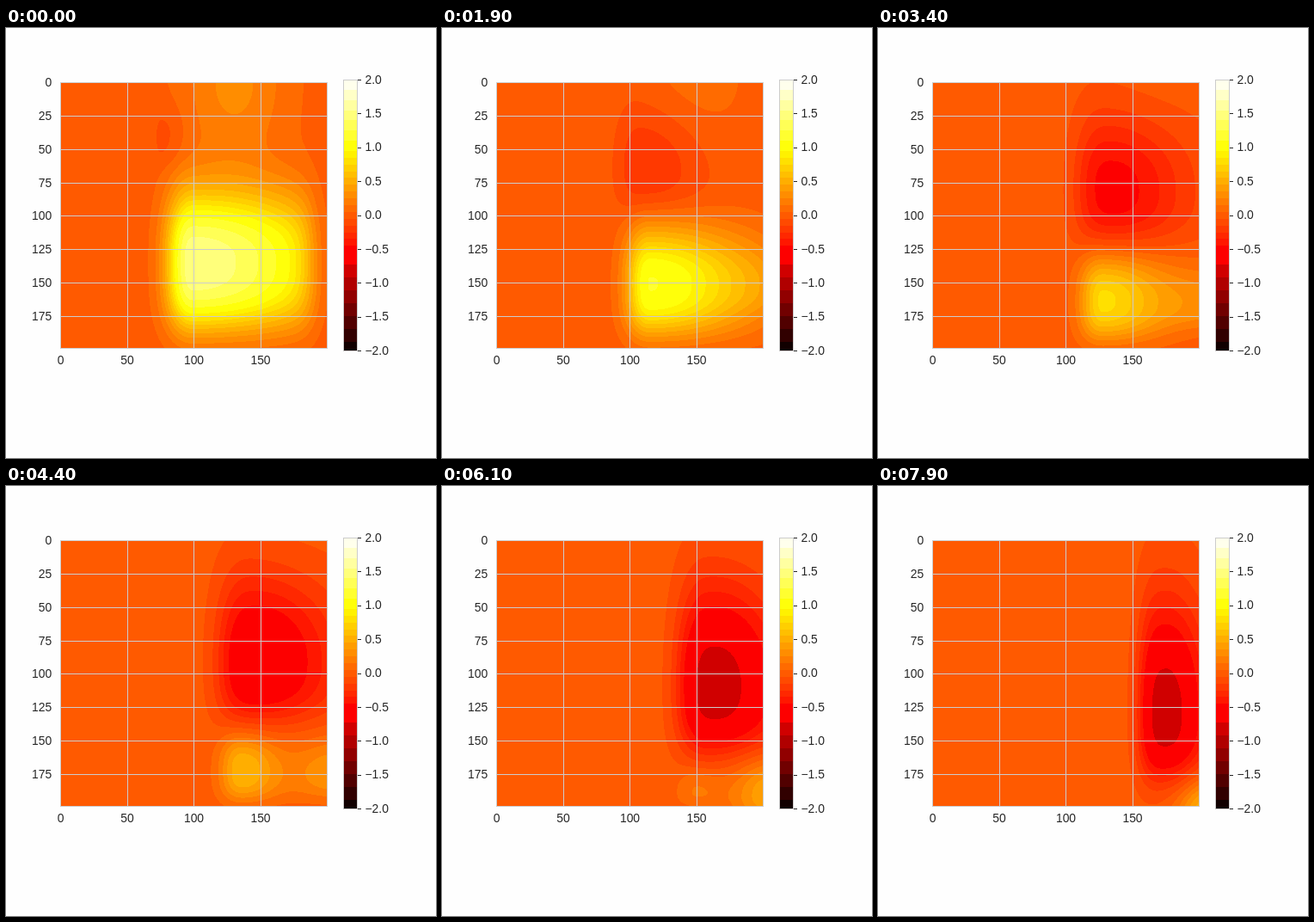
Animation of 500 by 500 pixels, one loop 8 s. Source, as an HTML page with a canvas:

```html
<!DOCTYPE html>
<html>
<head>
<meta charset="utf-8">
<style>
html, body { margin: 0; width: 100%; height: 100%; overflow: hidden; background: #fefefe; }
canvas, svg { position: absolute; left: 0; top: 0; }
text { font: 13.9px "Liberation Sans", Arial, sans-serif; fill: #262626; }
</style>
</head>
<body>
<canvas id="plot" width="500" height="500"></canvas>
<svg id="labels" width="500" height="500"></svg>
<script>
const LOOP = 8000, STEP = 100, LEFT = 64, TOP = 64, WIDTH = 309, HEIGHT = 308;
const PALE = '#cccccc', INK = '#262626';
const ctx = document.getElementById('plot').getContext('2d');
const labels = document.getElementById('labels');
const image = ctx.createImageData(WIDTH, HEIGHT);

const ease = k => k * k * (3 - 2 * k);
const bell = (d, width, power) => Math.exp(-Math.pow(Math.abs(d) / width, power));

// The swells that add up to the field; s runs from 0 to 1 over the loop.
// pow: falloff exponents for left, right, up and down.
function swells(s) {
  const crestY = 270 + 105 * s;
  return [
    { // sinking crest
      height: Math.max(0, 1.52 - 1.75 * s), x: 217 + 102 * s, y: crestY,
      left: 30 - 10 * s, right: Math.max(30, 170 - 230 * s),
      up: Math.max(20, 80 - 72 * s), down: Math.max(18, 79 - 77 * s),
      pow: [2.2, 2, 2.3, 3], cut: 356 + 165 * s
    },
    { // growing trough
      height: -0.11 - 0.73 * ease(Math.min(1, s / 0.8)),
      x: 185 + 250 * s - 100 * s * s, y: 123 + 137 * s,
      left: 14 + 110 * s - 92 * s * s, right: 22 + 25 * s + 55 * Math.sin(Math.PI * s),
      up: 35 + 140 * s - 48 * s * s, down: 36 + 100 * s - 55 * s * s,
      pow: [3, 2, 2, 3]
    },
    { // fading swell along the top edge
      height: 0.28 * Math.exp(-4 * s), x: 265 + 118 * s, y: 64,
      left: 62, right: 62, up: 95, down: 95, pow: [2, 2, 2, 2]
    },
    { // swell at the lower right edge
      height: 0.6 * s, x: 383, y: crestY + 5 * s,
      left: 85 - 52 * s, right: 50, up: 40, down: 32, pow: [2, 2, 2, 3]
    }
  ];
}

function profiles(w) {
  const across = Float64Array.from({ length: WIDTH }, (_, i) => {
    const d = LEFT + i - w.x;
    const v = w.height * (d < 0 ? bell(d, w.left, w.pow[0]) : bell(d, w.right, w.pow[1]));
    return w.cut ? v / (1 + Math.exp((LEFT + i - w.cut) / 8)) : v;
  });
  const down = Float64Array.from({ length: HEIGHT }, (_, i) => {
    const d = TOP + i - w.y;
    return d < 0 ? bell(d, w.up, w.pow[2]) : bell(d, w.down, w.pow[3]);
  });
  return { across, down };
}

// Centre of the colour band that holds v
function band(v) {
  if (v > 0.95) return 1.025 + 0.15 * Math.floor((v - 0.95) / 0.15);
  if (v > -0.45) return Math.round(v * 10) / 10;
  if (v > -0.73) return -0.55;
  return -0.82 - 0.19 * Math.floor((-0.73 - v) / 0.19);
}

// Black, red, yellow, white scale over -2 to 2
function heat(v) {
  const x = (band(v) + 2) / 4;
  const ramp = f => Math.round(255 * Math.min(1, Math.max(0, f)));
  return [ramp(0.0416 + 0.9584 * x / 0.365), ramp((x - 0.365) / 0.381), ramp((x - 0.746) / 0.254)];
}

const shades = Array.from({ length: 801 }, (_, i) => heat(i / 200 - 2));

function bar(x, y, w, h, color) {
  ctx.fillStyle = color;
  ctx.fillRect(x, y, w, h);
}

function drawField(t) {
  const parts = swells(Math.min(1, t / 7900)).map(profiles);
  for (let y = 0, p = 0; y < HEIGHT; y++) {
    for (let x = 0; x < WIDTH; x++, p += 4) {
      let v = 0;
      for (const { across, down } of parts) v += across[x] * down[y];
      const shade = shades[Math.max(0, Math.min(800, Math.round((v + 2) * 200)))];
      image.data.set(shade, p);
      image.data[p + 3] = 255;
    }
  }
  ctx.putImageData(image, LEFT, TOP);
  for (let i = 1; i < 8; i++) bar(LEFT, Math.round(63.4 + i * 38.75), WIDTH, 1, PALE);
  for (let i = 1; i < 4; i++) bar(Math.round(63.4 + i * 77.5), TOP, 1, HEIGHT, PALE);
}

function label(text, x, y, anchor) {
  const el = document.createElementNS('http://www.w3.org/2000/svg', 'text');
  el.setAttribute('x', x);
  el.setAttribute('y', y);
  el.setAttribute('text-anchor', anchor);
  el.textContent = text;
  labels.append(el);
}

function drawFrame() {
  ctx.strokeStyle = PALE;
  ctx.strokeRect(LEFT - 0.5, TOP - 0.5, WIDTH + 1, HEIGHT + 1);
  for (let i = 0; i < 8; i++) label(i * 25, 53.2, 68.3 + i * 38.75, 'end');
  for (let i = 0; i < 4; i++) label(i * 50, 63.5 + i * 77.5, 391, 'middle');
}

function drawScale() {
  for (let y = 60; y < 376; y++) bar(392, y, 17, 1, `rgb(${heat(2 - (y - 59.5) / 78.9)})`);
  ctx.strokeRect(392.5, 60.5, 16, 315);
  for (let i = 0; i < 9; i++) {
    const v = 2 - i / 2, y = 60 + i * 39.4;
    bar(409, Math.round(y), 4, 1, INK);
    label((v < 0 ? '\u2212' : '') + Math.abs(v).toFixed(1), 417.5, y + 4.5, 'start');
  }
}

drawFrame();
drawScale();

let shown = -1;
const start = performance.now();
function tick() {
  const t = Math.floor(((performance.now() - start) % LOOP) / STEP) * STEP;
  if (t !== shown) drawField(shown = t);
  requestAnimationFrame(tick);
}
tick();
</script>
</body>
</html>
```
